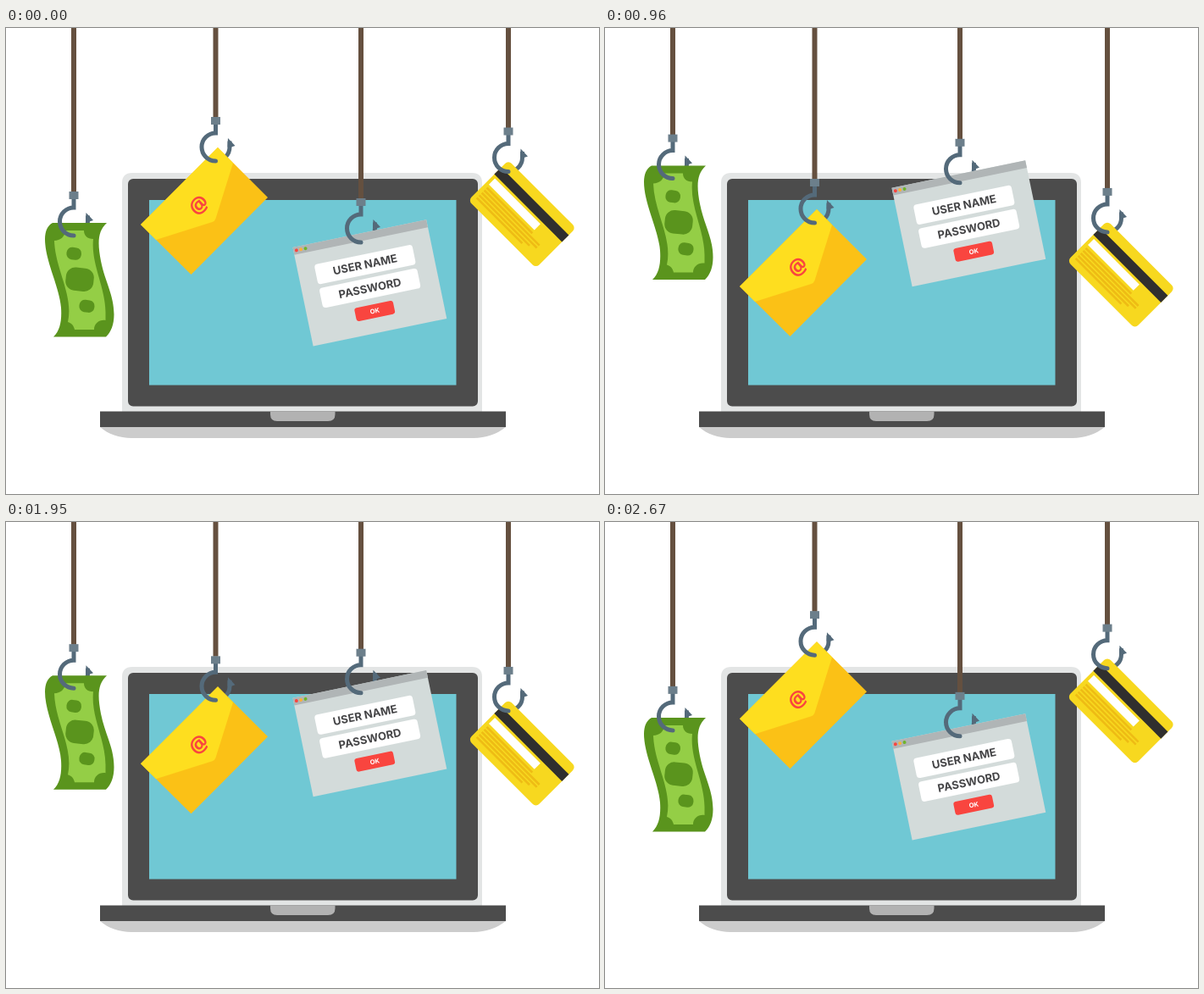
An HTML page for the animation above (2700 ms loop, 700 px wide and 550 px high).

```html
<!DOCTYPE html>
<html lang="en">
<head>
<meta charset="utf-8">
<title>Phishing</title>
<style>
  html, body { margin: 0; width: 100%; height: 100%; overflow: hidden; background: #fff; }
  svg { display: block; width: 700px; height: 550px; }
  text { text-anchor: middle; font-weight: 700; font-family: Inter, sans-serif; }
</style>
</head>
<body>
<svg viewBox="0 0 700 550">
  <defs>
    <g id="hook-back">
      <path d="M0 47.5A16.5 16.5 0 0 0 16.5 31V24" fill="none" stroke="#546a7a" stroke-width="5"/>
      <path d="M14.5 20.5L23 29.5L18.5 31H14Z" fill="#546a7a"/>
    </g>
    <g id="hook-front">
      <path d="M0 4V14.5A16.5 16.5 0 0 0 0 47.5" fill="none" stroke="#546a7a" stroke-width="5" stroke-linecap="round"/>
      <path d="M-3-320H3V-4H-3Z" fill="#65503f"/>
      <path d="M-5.5-4.5H5.5V4.5H-5.5Z" fill="#6c7f8b"/>
    </g>
  </defs>

  <g id="laptop">
    <path d="M137 453V183Q137 171 149 171H550Q562 171 562 183V453Z" fill="#e3e5e5"/>
    <rect x="144" y="178" width="413" height="268.500" rx="6" fill="#4c4c4c"/>
    <rect x="169" y="203" width="362.500" height="218.500" fill="#70c8d4"/>
    <path d="M111 471H590C580 479 566 484 552 484H148C134 484 120 479 111 471Z" fill="#cccccc"/>
    <rect x="111" y="452.500" width="479" height="18.500" fill="#4c4c4c"/>
    <path d="M312 452.500H388.500V456Q388.500 464 380 464H320Q312 464 312 456Z" fill="#b2b2b2"/>
  </g>

  <g id="money">
    <use href="#hook-back" x="80" y="197.500"/>
    <path d="M55 230H119C108 240 108 254 112 275C117 300 127.500 315 127.500 338C127.500 350 124 359 118 364.500H56C64 357 66 345 65 330C63 305 46 275 46 249C46 240 49 233 55 230Z" fill="#5a941d"/>
    <path d="M70 239H92C92 245 96 249 103 249C100 278 117 305 117.500 335V345C110 344 104 349 104 356H81C80 351 77 348 73 347C80 315 58 285 57 251C64 251 70 246 70 239Z" fill="#94ce46"/>
    <g fill="#5a941d">
      <rect x="71.500" y="259" width="17.500" height="14.500" rx="6.500" transform="rotate(8 80 266)"/>
      <rect x="70.500" y="283" width="33" height="27.500" rx="11" transform="rotate(6 87 297)"/>
      <rect x="86.500" y="321" width="18" height="14.500" rx="6.500" transform="rotate(8 95 328)"/>
    </g>
    <use href="#hook-front" x="80" y="197.500"/>
  </g>

  <g id="mail">
    <use href="#hook-back" x="247.500" y="109.500"/>
    <path d="M250 141L309 200L218.500 291L159 232Z" fill="#fbc116"/>
    <path d="M250 141L268 159.500L247.500 225Q246.500 228 243.500 229L177 250L159 232Z" fill="#fede1f"/>
    <text transform="translate(228 209.500) rotate(-45)" y="8" font-size="25" fill="#f9453f" style="font-family:'Open Sans',sans-serif">@</text>
    <use href="#hook-front" x="247.500" y="109.500"/>
  </g>

  <g id="login">
    <use href="#hook-back" x="419" y="205.500"/>
    <g transform="translate(338.500 259) rotate(-11.700)">
      <rect width="161" height="119" fill="#d3dbda"/>
      <rect width="161" height="9" fill="#b0b5b6"/>
      <circle cx="3.600" cy="4.200" r="2" fill="#f9453f"/>
      <circle cx="9" cy="4.200" r="2" fill="#fbb03b"/>
      <circle cx="14.500" cy="4.200" r="2" fill="#6fb52c"/>
      <g fill="#fff">
        <rect x="20.500" y="25" width="118" height="24" rx="4"/>
        <rect x="20.500" y="53.500" width="118" height="24" rx="4"/>
      </g>
      <rect x="56.300" y="85" width="46.500" height="16" rx="3" fill="#f9453f"/>
      <g font-size="13" fill="#454547">
        <text x="79.500" y="41.700">USER NAME</text>
        <text x="79.500" y="70.200">PASSWORD</text>
      </g>
      <text x="79.500" y="95.700" font-size="7.700" fill="#fff">OK</text>
    </g>
    <use href="#hook-front" x="419" y="205.500"/>
  </g>

  <g id="card">
    <use href="#hook-back" x="593" y="122"/>
    <g transform="translate(593 156) rotate(45)">
      <rect width="113" height="67" rx="5.500" fill="#f7d81f"/>
      <rect y="12" width="113" height="11.500" fill="#302f2e"/>
      <rect x="4" y="26.500" width="76" height="10" fill="#fff"/>
      <path d="M5 41H81M5 45.200H97M5 49.400H97M5 53.600H89M5 57.800H81" stroke="#eebc14" stroke-width="2.600"/>
    </g>
    <use href="#hook-front" x="593" y="122"/>
  </g>
</svg>
<script>
  const LOOP = 2700, STEP = 30;
  // travel: vertical offset at mid-loop; rest: offset at the end of the loop
  const items = [
    { id: 'money', travel: -84.5, rest: 1 },
    { id: 'mail', travel: 91.5, rest: 0 },
    { id: 'login', travel: -88, rest: 0 },
    { id: 'card', travel: 89.5, rest: 3 },
  ].map(item => ({ ...item, node: document.getElementById(item.id) }));

  const smooth = u => u * u * (3 - 2 * u);
  const mix = (a, b, k) => a + (b - a) * k;

  function draw(now) {
    const u = Math.floor((now % LOOP) / STEP) * STEP / LOOP * 2;
    for (const { node, travel, rest } of items) {
      const y = u < 1 ? mix(0, travel, smooth(u)) : mix(travel, rest, smooth(u - 1));
      node.setAttribute('transform', `translate(0 ${y})`);
    }
  }

  const start = performance.now();
  function tick() {
    draw(performance.now() - start);
    requestAnimationFrame(tick);
  }
  tick();
</script>
</body>
</html>
```
